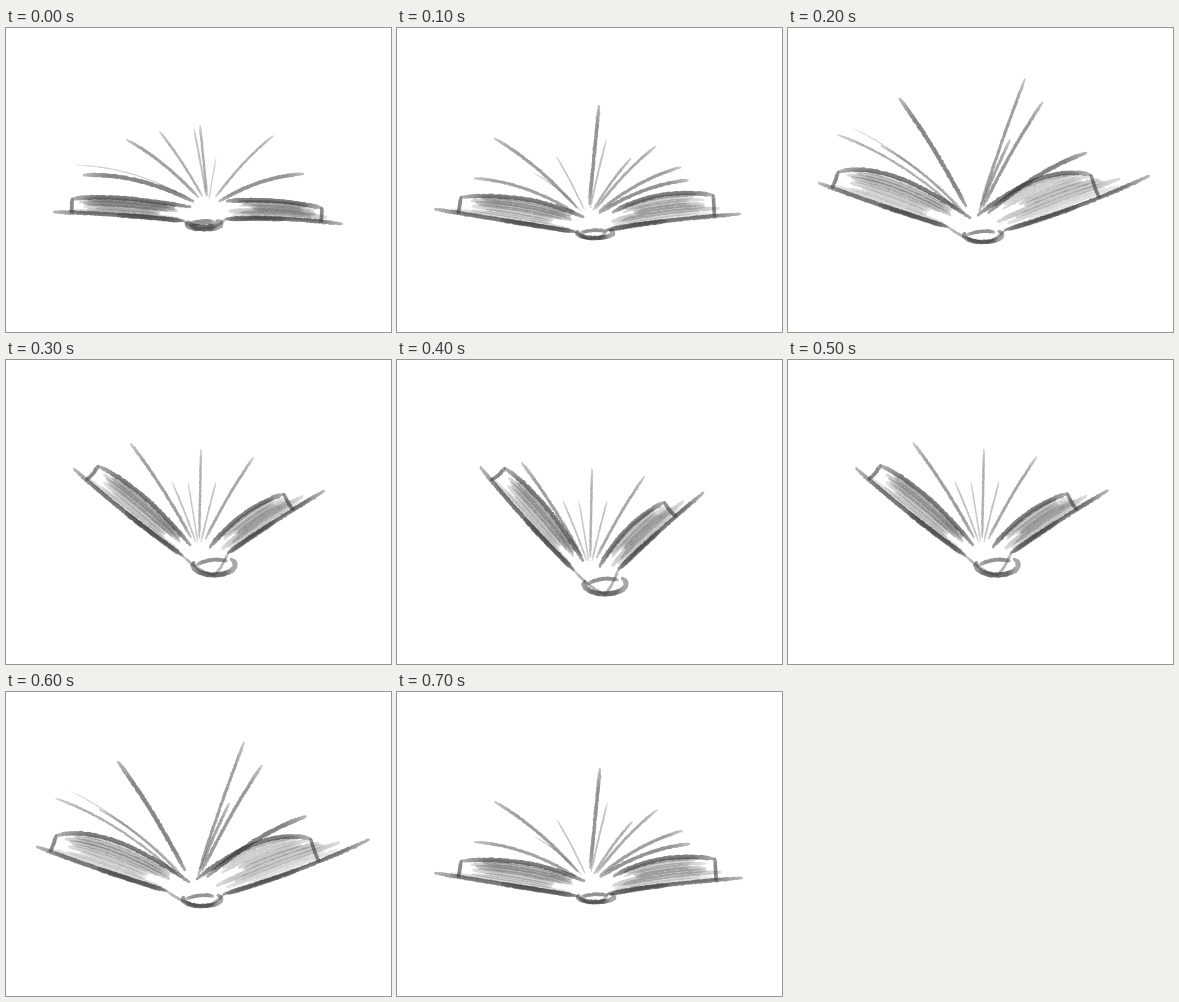
Recreate the animation shown at these times as an HTML page with a canvas. Size 385x304 px, loop 0.8 s.

```html
<!DOCTYPE html>
<html lang="en">
<head>
<meta charset="utf-8">
<title>Flapping book</title>
<style>
html, body { margin: 0; width: 100%; height: 100%; overflow: hidden; background: #fff; }
canvas { display: block; width: 385px; height: 304px; }
</style>
</head>
<body>
<canvas id="stage" width="385" height="304"></canvas>
<script>
const W = 385, H = 304, STEP = 100;

// Cover curves run from the outer end to the spine through a middle point.
// Pages: tip x, tip y, weight. Spine: centre, radii, line width.
const flat = {
  left: { top: [[66, 171], [114, 170], [184, 179]], bottom: [[48, 184], [112, 187], [178, 193]] },
  right: { top: [[316, 180], [270, 173], [221, 173]], bottom: [[336, 196], [278, 191], [220, 191]] },
  hinge: [202, 177],
  pages: [[78, 147, 3.5], [70, 137, 1], [121, 112, 2.5], [154, 104, 2], [188, 101, 1.5],
    [194, 98, 2], [210, 130, 1], [267, 108, 2], [297, 146, 3]],
  spine: [198, 196, 16, 4, 6]
};

const low = {
  left: { top: [[64, 169], [128, 171], [187, 189]], bottom: [[38, 181], [105, 192], [180, 204]] },
  right: { top: [[318, 167], [265, 167], [217, 184]], bottom: [[345, 186], [270, 193], [211, 202]] },
  hinge: [192, 189],
  pages: [[78, 150, 2.5], [98, 110, 2.6], [138, 145, 1], [160, 128, 1.3], [203, 77, 3],
    [210, 112, 1.5], [235, 130, 2], [260, 118, 2.2], [285, 139, 2.6], [292, 152, 3]],
  spine: [199, 205, 18, 5, 4]
};

const half = {
  left: { top: [[50, 144], [108, 149], [182, 190]], bottom: [[31, 155], [92, 177], [160, 199]] },
  right: { top: [[303, 147], [251, 151], [190, 187]], bottom: [[361, 148], [290, 178], [217, 202]] },
  hinge: [187, 193],
  pages: [[50, 107, 2], [93, 118, 2], [65, 100, 1], [112, 71, 3.5], [237, 51, 2.6],
    [254, 75, 2.8], [222, 112, 2.4], [298, 125, 3.6]],
  spine: [195, 207, 19, 7, 4]
};

const raised = {
  left: { top: [[92, 106], [137, 136], [184, 185]], bottom: [[68, 109], [120, 153], [177, 196]] },
  right: { top: [[278, 134], [238, 154], [204, 187]], bottom: [[318, 131], [268, 162], [222, 193]] },
  hinge: [193, 190],
  pages: [[125, 84, 2.6], [166, 122, 1.4], [182, 122, 1.2], [195, 90, 2],
    [210, 122, 1.4], [247, 98, 2.3]],
  spine: [208, 205, 21, 10, 4.5]
};

function randomizer(seed) {
  return () => {
    seed = (seed * 1664525 + 1013904223) >>> 0;
    return seed / 4294967296;
  };
}

const mix = (a, b, t) => a.map((v, i) => v + (b[i] - v) * t);

// Parabola through three points, the middle one at t = 0.5
const through = ([a, m, b]) => t => a.map((v, i) =>
  v * (1 - t) * (1 - 2 * t) + m[i] * 4 * t * (1 - t) + b[i] * t * (2 * t - 1));

const line = (a, b, arch = 0) => {
  const [x, y] = mix(a, b, 0.5);
  return through([a, [x, y - arch], b]);
};

const part = (curve, from, to) => t => curve(from + (to - from) * t);

function nearest(curve, [x, y]) {
  let best, least = Infinity;
  for (let t = 0; t <= 1; t += 0.01) {
    const p = curve(t), d = Math.hypot(p[0] - x, p[1] - y);
    if (d < least) [best, least] = [p, d];
  }
  return best;
}

function turn([x, y], angle, drop) {
  const dx = x - 205, dy = y - 195, c = Math.cos(angle), s = Math.sin(angle);
  return [205 + dx * c - dy * s, 195 + drop + dx * s + dy * c];
}

// A soft, rough pencil line that fades towards both ends
function pencil(g, rnd, curve, width, dark) {
  const n = 240, ends = [...curve(0), ...curve(1)];
  const shade = g.createLinearGradient(...ends);
  for (const [at, k] of [[0, 0.6], [0.2, 1], [0.85, 1], [1, 0.7]]) {
    shade.addColorStop(at, `rgba(40,40,40,${dark * k})`);
  }
  g.beginPath();
  for (let i = 0; i <= n; i++) {
    const t = i / n;
    const taper = Math.min(1, 0.6 + 5 * Math.min(t, 1 - t));
    const r = width / 2 * taper * (0.75 + rnd() * 0.4);
    const [x, y] = curve(t).map(v => v + (rnd() - 0.5) * 0.6);
    g.moveTo(x + r, y);
    g.arc(x, y, r, 0, 7);
  }
  g.fillStyle = shade;
  g.fill();
}

function sketch(pose, { size = 1, fold = 0, drop = 0 } = {}) {
  const layer = document.createElement('canvas');
  layer.width = W;
  layer.height = H;
  const g = layer.getContext('2d');
  const rnd = randomizer(71);
  const draw = (curve, width, dark) => pencil(g, rnd, curve, width, dark);
  g.filter = 'blur(0.6px)';
  g.translate(40, 200);
  g.scale(size, size);
  g.translate(-40, -200);

  const [cx, y, rx, ry, weight] = pose.spine;
  const cy = y + drop;

  function wing({ top, bottom }, angle) {
    const place = pts => through(pts.map(p => turn(p, angle, drop)));
    const upper = place(top), lower = place(bottom);
    for (let i = 0; i < 10; i++) {
      const v = 0.08 + i * 0.1;
      const hatch = t => mix(upper(t), lower(t), v);
      const from = 0.08 + rnd() * 0.25, to = 0.75 + rnd() * 0.22;
      draw(part(hatch, from, to), 2.5 + rnd() * 2, 0.14 + rnd() * 0.2);
    }
    draw(upper, 4.2, 0.6);
    draw(lower, 4, 0.56);
    draw(part(lower, 0.5, 0.98), 4.6, 0.42);
    draw(line(upper(0), nearest(lower, upper(0)), -2), 3.2, 0.55);
    draw(line(lower(1), [cx, cy + ry], -3), 2.4, 0.35);
  }

  wing(pose.left, fold);
  wing(pose.right, -fold);

  const hinge = turn(pose.hinge, 0, drop);
  for (const [tx, ty, w] of pose.pages) {
    const tip = [tx, ty + drop];
    const arch = Math.abs(tx - hinge[0]) * 0.06;
    draw(line(tip, mix(hinge, tip, 0.12), arch), w * 1.15, 0.12 + w * 0.125);
  }

  const rim = t => {
    const a = -0.6 + t * 4;
    return [cx + rx * Math.cos(a), cy + ry * Math.sin(a)];
  };
  draw(rim, weight, 0.68);
  draw(line([cx - rx * 0.85, cy], [cx + rx * 0.6, cy - ry * 0.4], ry * 0.3), weight * 0.75, 0.5);
  return layer;
}

const wide = { size: 1.006 };
const poses = [
  sketch(flat),
  sketch(low, { size: 0.994 }),
  sketch(half),
  sketch(raised),
  sketch(raised, { fold: 0.16, drop: 19 }),
  sketch(raised, wide),
  sketch(half, wide),
  sketch(low)
];

const ctx = document.getElementById('stage').getContext('2d');

function show() {
  const step = Math.floor(performance.now() / STEP) % poses.length;
  ctx.fillStyle = '#fff';
  ctx.fillRect(0, 0, W, H);
  ctx.drawImage(poses[step], 0, 0);
  requestAnimationFrame(show);
}
show();
</script>
</body>
</html>
```
